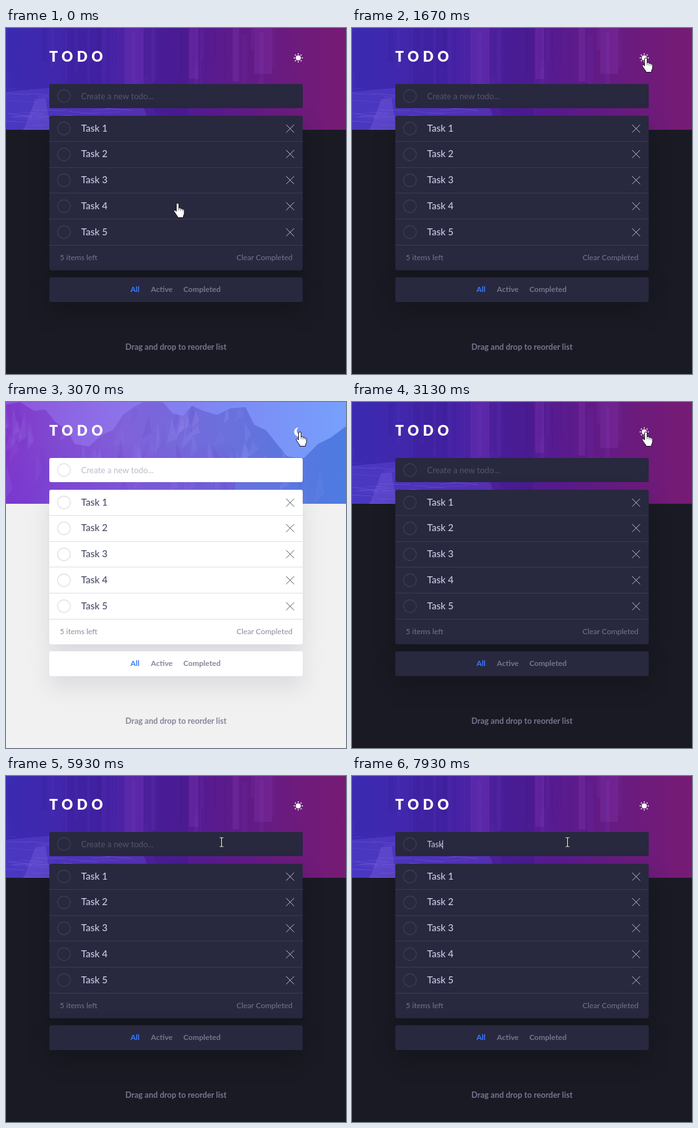
These frames come from a looping animation (534x544 px, 8000 ms). An HTML page:

```html
<!DOCTYPE html>
<html lang="en">
<head>
<meta charset="utf-8">
<title>Todo</title>
<style>
  html, body { margin: 0; width: 100%; height: 100%; overflow: hidden; }
  svg { display: block; width: 534px; height: 544px; font-family: Lato, "Open Sans", sans-serif; }
  .dark {
    --page: #1a1a24; --card: #28283f; --line: #3a3b52; --ring: #3b3c54; --text: #c8cbe7;
    --hint: #55566c; --muted: #75768e; --tab: #75768e; --cross: #b9bbd0; --shade: rgba(0, 0, 0, .2);
  }
  .light {
    --page: #f1f1f1; --card: #fff; --line: #e0e0e6; --ring: #e0e0e8; --text: #494c6b;
    --hint: #bcbcc8; --muted: #8b8c9e; --tab: #85869a; --cross: #56576c; --shade: rgba(165, 167, 182, .3);
  }
  .dark .day, .light .night { display: none; }
  .page { fill: var(--page); }
  .card { fill: var(--card); }
  .raised { filter: drop-shadow(0 16px 17px var(--shade)); }
  .line { stroke: var(--line); }
  .ring { fill: none; stroke: var(--ring); stroke-width: 1.3; }
  .cross { fill: none; stroke: var(--cross); }
  .task { fill: var(--text); font-size: 15px; font-weight: 500; }
  .field { fill: var(--text); font-size: 13px; }
  .field.empty { fill: var(--hint); }
  .info { fill: var(--muted); font-size: 12px; }
  .tab { fill: var(--tab); font-size: 12px; font-weight: 700; }
  .tab.on { fill: #3a7bfd; }
  .hint { font-size: 12.6px; text-anchor: middle; }
  .title { fill: #fff; font-size: 22px; font-weight: 900; letter-spacing: 6.2px; }
  .cursor > * { fill: #fff; stroke: #15151c; stroke-linejoin: round; }
</style>
</head>
<body>
<svg id="app" class="dark" viewBox="0 0 534 544">
  <defs>
    <linearGradient id="hall">
      <stop offset="0" stop-color="#3a2bb2"/>
      <stop offset=".3" stop-color="#4823a6"/>
      <stop offset=".6" stop-color="#581b8f"/>
      <stop offset=".85" stop-color="#6d1b7c"/>
      <stop offset="1" stop-color="#771b74"/>
    </linearGradient>
    <linearGradient id="sky">
      <stop offset="0" stop-color="#8c54dc"/>
      <stop offset=".3" stop-color="#8d70e8"/>
      <stop offset=".65" stop-color="#7d8af4"/>
      <stop offset="1" stop-color="#76a0fc"/>
    </linearGradient>
    <linearGradient id="rock" gradientUnits="userSpaceOnUse" x2="534">
      <stop offset="0" stop-color="#8038ca"/>
      <stop offset=".35" stop-color="#8062da"/>
      <stop offset=".65" stop-color="#6a70dc"/>
      <stop offset="1" stop-color="#4c7ce2"/>
    </linearGradient>
    <linearGradient id="mist" x2="0" y2="1">
      <stop offset=".4" stop-color="#7a34d0" stop-opacity="0"/>
      <stop offset="1" stop-color="#7038d4" stop-opacity=".45"/>
    </linearGradient>
    <clipPath id="top"><path d="M0 0H534V160H0z"/></clipPath>
    <clipPath id="ridge"><use href="#peaks"/></clipPath>
  </defs>

  <path class="page" d="M0 0H534V544H0z"/>

  <g class="night" clip-path="url(#top)">
    <path fill="url(#hall)" d="M0 0H534V160H0z"/>
    <path fill="#6450dc" fill-opacity=".35" d="M0 100L70 94 215 122 230 160H0z"/>
    <path fill="#8068e4" fill-opacity=".3" d="M28 160L46 112 62 110 70 160z"/>
    <path fill="#2a1580" fill-opacity=".2" d="M96 0H150V92L96 98zM232 0H286V160H250L232 128z"/>
    <path fill="#a04ad0" fill-opacity=".16" d="M186 0h30v92h-30zM288 0h14v80h-14zM356 0h10v84h-10zM390 0h28v72h-28z"/>
    <g id="pillars"></g>
  </g>

  <g class="day" clip-path="url(#top)">
    <path fill="url(#sky)" d="M0 0H534V160H0z"/>
    <path id="peaks" fill="url(#rock)" d="M0 4L22 0 44 14 62 12 78 32 96 44 108 66 130 70 150 52 168 44 184 20 204 6 216 0H246L262 18 278 22 292 6 310 14 332 20 352 10 376 8 390 36 408 44 424 64 442 86 468 88 490 66 510 56 534 38V160H0z"/>
    <g id="facets" clip-path="url(#ridge)"></g>
    <path fill="url(#mist)" d="M0 0H360V160H0z"/>
  </g>

  <text class="title" x="68" y="53">TODO</text>

  <g class="night" fill="#fff">
    <circle cx="459" cy="47" r="4"/>
    <g id="rays"></g>
  </g>
  <path class="day" fill="#fff" d="M459.6 40.1A7 7 0 1 0 465.7 50.6 5.9 5.9 0 0 1 459.6 40.1z"/>

  <rect class="card" x="68" y="88" width="398" height="38" rx="3"/>
  <circle class="ring" cx="91" cy="107" r="10"/>
  <text id="field" class="field empty" x="118" y="112">Create a new todo...</text>
  <path id="caret" d="M0 101V114.500" stroke="#c8cbe7" visibility="hidden"/>

  <rect class="card raised" x="68" y="138" width="398" height="243" rx="3"/>
  <g id="list"></g>
  <text class="info" x="84.500" y="364.500">5 items left</text>
  <text class="info" x="450" y="364.500" text-anchor="end">Clear Completed</text>

  <rect class="card raised" x="68" y="392" width="398" height="39" rx="3"/>
  <text class="tab on" x="195.500" y="414.500">All</text>
  <text class="tab" x="227.500" y="414.500">Active</text>
  <text class="tab" x="278.500" y="414.500">Completed</text>
  <text class="tab hint" x="267" y="505.500">Drag and drop to reorder list</text>

  <g id="cursor" class="cursor">
    <g id="hand">
      <path d="M-2 1.500a2 2 0 0 1 4 0V7.500c1-1.200 3-.7 3 .9 1-1 2.900-.5 3 1.100 1-.8 2.500-.3 2.500 1.200V15c0 2-1 3-1.500 4.500V22H0V20.500C-2 18-4 14.800-5.500 12.300-6.300 10.800-4.800 9.700-3.500 10.700L-2 12.200z"/>
      <path d="M2 7.500V11M5 8.400V11.500M8 9.500V12" stroke-opacity=".6"/>
    </g>
    <g id="beam" fill="none">
      <path d="M-3 -7H3M-3 7H3M0 -7V7" style="stroke:#15151c;stroke-width:2.6"/>
      <path d="M-3 -7H3M-3 7H3M0 -7V7" style="stroke:#f2f2f6;stroke-width:1.200"/>
    </g>
    <path id="arrow" d="M0 0V16.500L3.800 13 6.300 18.800 8.900 17.700 6.400 12H11.500z"/>
  </g>
</svg>

<script>
const $ = id => document.getElementById(id);
const NS = "http://www.w3.org/2000/svg";
const LOOP = 8000, STEP = 1000 / 15;

function add(parent, tag, attrs, text) {
  const node = document.createElementNS(NS, tag);
  for (const key in attrs) node.setAttribute(key, attrs[key]);
  if (text) node.textContent = text;
  return $(parent).appendChild(node);
}

let seed = 7;
function rand(lo, hi) {
  seed = (seed * 16807) % 2147483647;
  return lo + (hi - lo) * seed / 2147483647;
}

// To-do rows
for (let i = 0; i < 5; i++) {
  const mid = 158 + i * 40.75, y = Math.floor(mid);
  add("list", "circle", { class: "ring", cx: 91, cy: mid, r: 10 });
  add("list", "text", { class: "task", x: 118, y: y + 5 }, "Task " + (i + 1));
  add("list", "path", { class: "cross", d: `M440 ${y - 6}l12.500 12.500m0 -12.500l-12.500 12.500` });
  add("list", "path", { class: "line", d: `M68 ${Math.floor(mid + 20.3) + .5}H466` });
}

for (let i = 0; i < 8; i++) {
  const a = i * Math.PI / 4;
  add("rays", "circle", { cx: 459 + 6.3 * Math.cos(a), cy: 47 + 6.3 * Math.sin(a), r: 0.95 });
}

// Hall: columns, floor tiles and glints
for (let i = 0; i < 30; i++) {
  add("pillars", "rect", {
    x: rand(0, 430), y: rand(-20, 10), width: rand(2, 9), height: rand(50, 110),
    fill: i % 2 ? "#8a5ce0" : "#2a0f78", "fill-opacity": rand(.03, .1)
  });
}
for (let i = 0; i < 40; i++) {
  add("pillars", "path", {
    d: `M${rand(-30, 150)} ${rand(98, 160)}l${rand(20, 80)} ${rand(-4, 5)}`,
    stroke: "#8d78ee", "stroke-opacity": rand(.12, .35)
  });
}

// Mountain faces
for (let i = 0; i < 90; i++) {
  add("facets", "path", {
    d: `M${rand(-10, 530)} ${rand(-5, 110)}l${rand(3, 12)} ${rand(14, 40)}l${rand(-20, -8)} ${rand(4, 20)}z`,
    fill: i % 3 ? "#b0a4f8" : "#5a38c0", "fill-opacity": rand(.05, .17)
  });
}

const stops = [[0, 269.5, 276], [70, 269.5, 276], [870, 461.5, 47.5], [3270, 461.5, 47.5], [3930, 338.5, 104]];
function pointer(t) {
  let i = stops.length - 1;
  while (stops[i][0] > t) i--;
  const [t0, x0, y0] = stops[i], next = stops[i + 1];
  if (!next) return [x0, y0];
  const p = (t - t0) / (next[0] - t0), e = p * p * (3 - 2 * p);
  return [x0 + (next[1] - x0) * e, y0 + (next[2] - y0) * e];
}

function shape(x, y) {
  const inside = x > 68 && x < 466;
  if (inside && y > 88 && y < 126) return "beam";
  const onIcon = Math.hypot(x - 459, y - 47) < 9;
  return onIcon || (inside && y > 138 && y < 341) ? "hand" : "arrow";
}

const keys = [7330, 7470, 7730, 7870];
let typed = -1;

function draw(t) {
  $("app").setAttribute("class", t >= 1728 && t < 3128 ? "light" : "dark");

  const [x, y] = pointer(t), kind = shape(x, y);
  $("cursor").setAttribute("transform", `translate(${x.toFixed(1)} ${y.toFixed(1)})`);
  for (const id of ["hand", "beam", "arrow"]) $(id).style.display = id === kind ? "" : "none";

  const count = keys.filter(k => t >= k - 4).length;
  if (count !== typed) {
    typed = count;
    $("field").textContent = count ? "Task".slice(0, count) : "Create a new todo...";
    $("field").setAttribute("class", count ? "field" : "field empty");
    const end = count ? 118 + $("field").getComputedTextLength() : 118;
    $("caret").setAttribute("transform", `translate(${Math.floor(end) + .5} 0)`);
  }
  const on = t >= 7128 || (t >= 6128 && t < 6664);
  $("caret").setAttribute("visibility", on ? "visible" : "hidden");
}

const start = performance.now();
function tick() {
  const t = (performance.now() - start) % LOOP;
  draw(Math.floor((t + 4) / STEP) * STEP);
  requestAnimationFrame(tick);
}
tick();
</script>
</body>
</html>
```
